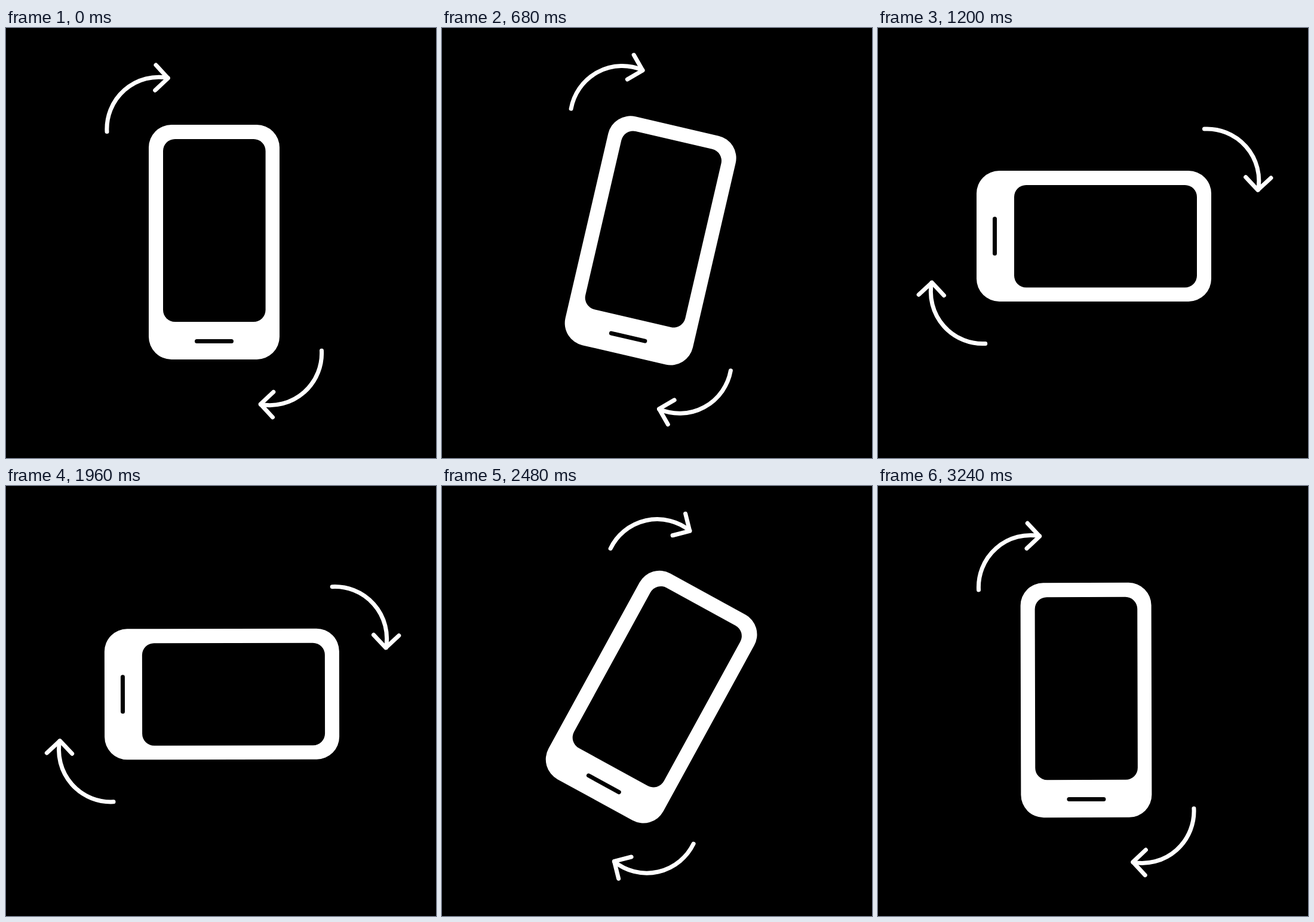
An HTML page for the animation above (3.28 s loop, 720x720 px).

```html
<!DOCTYPE html>
<html lang="en">
<head>
<meta charset="utf-8">
<title>Rotate your phone</title>
<style>
  html, body { margin: 0; width: 100%; height: 100%; overflow: hidden; background: #000; }
  svg { display: block; width: 100%; height: 100%; }
  .line { fill: none; stroke: #fff; stroke-width: 7; stroke-linecap: round; stroke-linejoin: round; }
</style>
</head>
<body>
<svg viewBox="0 0 720 720">
  <defs>
    <g id="arrow" class="line">
      <path d="M169 173.5A87 87 0 0 1 271 83.5"/>
      <path d="M251 62L271.3 84L249.7 104.3"/>
    </g>
  </defs>
  <g id="scene">
    <rect x="239" y="162" width="219" height="393" rx="38" fill="#fff"/>
    <rect x="263" y="186" width="171.6" height="306" rx="20"/>
    <rect x="316" y="521" width="65" height="7" rx="3.5"/>
    <use href="#arrow"/>
    <use href="#arrow" transform="rotate(180 348.75 356.9)"/>
  </g>
</svg>
<script>
  const LOOP = 3280, STEP = 40;
  const TILT_END = 1190, RETURN_START = 1920;

  // Slow wind-up, quick finish.
  function easeTilt(p) {
    const u = p ** 2.55;
    return u * u * (3 - 2 * u);
  }

  const bezier = (s, a, b) => 3 * s * (1 - s) ** 2 * a + 3 * s * s * (1 - s) * b + s ** 3;

  // Bezier easing that swings a touch past the end and settles.
  function easeReturn(p) {
    let low = 0, high = 1;
    for (let i = 0; i < 24; i++) {
      const mid = (low + high) / 2;
      if (bezier(mid, 0.55, 0.08) < p) low = mid; else high = mid;
    }
    return bezier(low, 0, 1.06);
  }

  function angleAt(time) {
    if (time < TILT_END) return 90 * easeTilt(time / TILT_END);
    if (time <= RETURN_START) return 90;
    return 90 * (1 - easeReturn((time - RETURN_START) / (LOOP - RETURN_START)));
  }

  const scene = document.getElementById('scene');
  const start = performance.now();

  function draw() {
    const time = (performance.now() - start) % LOOP;
    const angle = angleAt(Math.floor(time / STEP) * STEP);
    scene.setAttribute('transform', `rotate(${angle.toFixed(3)} 360 360)`);
    requestAnimationFrame(draw);
  }
  draw();
</script>
</body>
</html>
```
